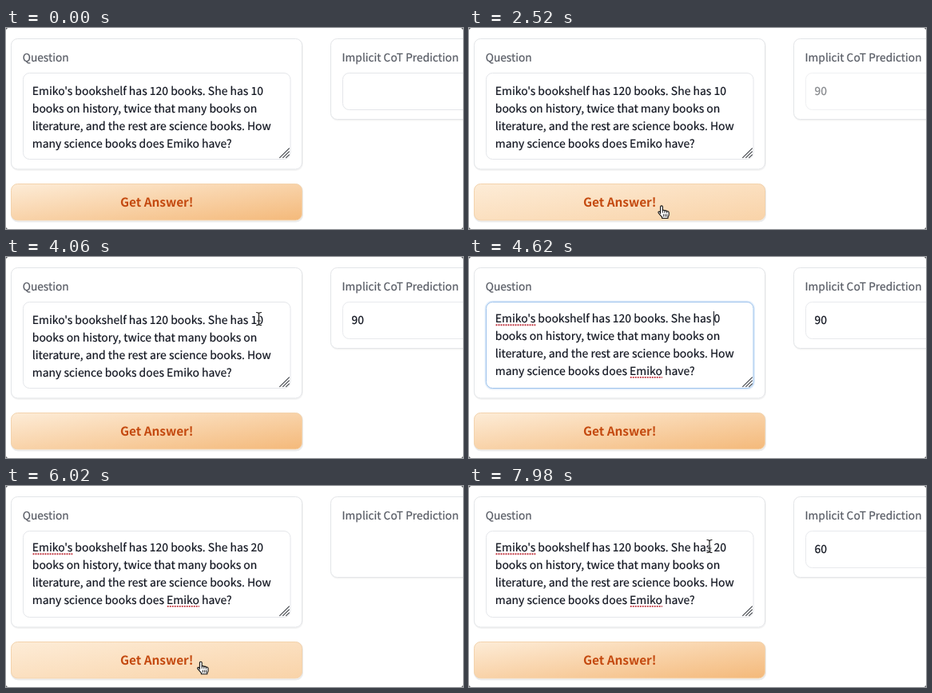
These frames come from a looping animation (572 by 252 pixels, 8 s). An HTML page:

```html
<!DOCTYPE html>
<html lang="en">
<head>
<meta charset="utf-8">
<title>Question form</title>
<style>
  html, body { margin: 0; width: 100%; height: 100%; overflow: hidden; background: #fff; }
  svg { display: block; }
  text {
    font: 13.95px "Noto Sans CJK JP", "Noto Sans CJK SC", "Noto Sans CJK", "Open Sans", sans-serif;
    color: #10141f; fill: currentColor; stroke: currentColor; stroke-width: .2;
    text-rendering: geometricPrecision; white-space: pre;
  }
  .label { font-size: 13.75px; color: #585c65; }
  .action { font-size: 15.4px; font-weight: 700; color: #c44a10; stroke: none; }
  .panel { fill: #fff; stroke: #e3e5e8; }
  .soft { fill: none; stroke: #000; stroke-opacity: .045; stroke-width: 2; }
  .field { fill: #fff; stroke: #e4e6ea; }
  .wavy { stroke: #bf2f3a; stroke-width: 1.9; stroke-dasharray: 1.8 1.2; }
  .grip { stroke: #3f4248; stroke-width: 1.1; }
</style>
</head>
<body>
<svg width="572" height="252" viewBox="0 0 572 252">
  <defs>
    <linearGradient id="fade" x1="0" y1="0" x2="1" y2="1">
      <stop offset="0" stop-color="#fdecd7"/>
      <stop id="fadeEnd" offset="1" stop-color="#f4b97a"/>
    </linearGradient>
  </defs>

  <rect class="soft" x="7" y="14.5" width="364" height="163.5" rx="8"/>
  <rect class="panel" x="6.5" y="13.5" width="364" height="163.5" rx="8"/>
  <text class="label" x="20.7" y="42">Question</text>
  <rect id="ring" x="21.5" y="56.5" width="334.5" height="108" rx="8" fill="none" stroke="#e2eefb" stroke-width="4"/>
  <rect id="box" class="field" x="21.5" y="56.5" width="334.5" height="108" rx="8"/>
  <g id="lines"></g>
  <g id="marks">
    <line class="wavy"/>
    <line class="wavy"/>
  </g>
  <line id="caret" stroke="#10141f" stroke-width="1"/>
  <path class="grip" d="M342.3 162.8L354.7 150.6M346.3 162.8L354.7 154.6M350.3 162.8L354.7 158.6"/>

  <rect class="soft" x="7" y="196.5" width="364" height="46" rx="8" style="stroke-opacity: .08"/>
  <rect x="6.5" y="195.5" width="364" height="45.5" rx="8" fill="url(#fade)" stroke="#f3d3ad"/>
  <text class="action" x="188.7" y="224" text-anchor="middle">Get Answer!</text>

  <rect class="soft" x="407" y="14.5" width="200" height="101" rx="8"/>
  <rect class="panel" x="406.5" y="13.5" width="200" height="101" rx="8"/>
  <text class="label" x="420.6" y="42">Implicit CoT Prediction</text>
  <g id="output">
    <rect id="outBox" class="field" x="421.5" y="56.5" width="180" height="46" rx="8"/>
    <text id="result" x="432.6" y="84.3"></text>
  </g>

  <path d="M0 0H2.5Q.5 .5 0 2.5ZM0 252V249.5Q.5 251.5 2.5 252ZM572 252V249.5Q571.5 251.5 569.5 252ZM572 0H569.5Q571.5 .5 572 2.5Z" fill="#55575a"/>

  <g id="cursor">
    <g id="hand" stroke="#111" stroke-linejoin="round" stroke-linecap="round">
      <path fill="#fff" stroke-width="1.1" d="M-4.4 2.2V-6a1.4 1.4 0 0 1 2.8 0V-1.6Q-.2-2.6 1-1.2Q2.5-2 3.6-.5Q5.8-1 6.2 1V3.8Q6.2 5.4 5 6.6V8.2H-2.4V6.8L-6.9 1.6Q-7.5-.1-6-.2Q-5.2 0-4.4 1.2Z"/>
      <path fill="none" stroke-width=".9" d="M-1.6-1.6V1M1-1.2V1.2M3.6-.5V1.5M-.6 3.4V6M1.6 3.4V6M3.7 3.4V6"/>
    </g>
    <g id="beam" fill="none" stroke-linecap="round">
      <path stroke="#fff" stroke-width="2.6" d="M-3-8Q0-8 0-6V6Q0 8-3 8M3-8Q0-8 0-6M0 6Q0 8 3 8M-2 2.5H2"/>
      <path stroke="#1a1a1a" stroke-width="1.2" d="M-3-8Q0-8 0-6V6Q0 8-3 8M3-8Q0-8 0-6M0 6Q0 8 3 8M-2 2.5H2"/>
    </g>
    <path id="arrow" fill="#111" stroke="#fff" d="M-4-8V6L-1 3.3L1 8L3.2 7L1.2 2.6H5.4Z"/>
  </g>
</svg>

<script>
const LOOP = 8000, TICK = 70;
const NAME = "Emiko";
const $ = id => document.getElementById(id);
const show = (el, on) => el.setAttribute("visibility", on ? "visible" : "hidden");
const put = (el, attrs) => { for (const k in attrs) el.setAttribute(k, attrs[k]); };

const words = [
  `${NAME}'s bookshelf has 120 books. She has `,
  "books on history, twice that many books on",
  "literature, and the rest are science books. How",
  `many science books does ${NAME} have?`
];
const lines = words.map(w => {
  const el = document.createElementNS("http://www.w3.org/2000/svg", "text");
  el.setAttribute("x", 32.8);
  el.textContent = w;
  $("lines").append(el);
  return el;
});

// time, x, y of the cursor's centre
const path = [
  [560, 238, 236], [630, 241, 233], [770, 244, 230.3],
  [2660, 244, 230.3], [2800, 248, 216], [2940, 262, 178], [3150, 287, 120],
  [3360, 299, 88], [3500, 303, 79], [3710, 314, 78.5], [3920, 316.5, 77.5],
  [5110, 316.5, 77.5], [5180, 311, 92], [5250, 296, 132], [5320, 272, 182],
  [5390, 256, 212.5], [5600, 246.8, 227.6],
  [7280, 246.8, 227.6], [7420, 250, 212], [7560, 264, 170], [7770, 287, 108],
  [7910, 298, 80], [7980, 301, 75.5]
];

// time, text, colour, border, visible
const outputs = [
  [0, "", "#10141f", "#e4e6ea", true],
  [1610, "", "#85878b", "#eff0f2", true],
  [2520, "90", "#85878b", "#eff0f2", true],
  [2590, "90", "#10141f", "#e8eaed", true],
  [5740, "90", "#85878b", "#eff0f2", true],
  [5810, "", "#85878b", "#eff0f2", false],
  [6860, "60", "#85878b", "#eff0f2", true],
  [6930, "60", "#10141f", "#e8eaed", true]
];

const within = (t, a, b) => t >= a && t < b;

function cursorAt(t) {
  const i = path.findIndex(p => p[0] > t);
  if (i < 0) return path[path.length - 1].slice(1);
  const [t0, x0, y0] = path[i - 1], [t1, x1, y1] = path[i];
  const k = (t - t0) / (t1 - t0);
  return [x0 + (x1 - x0) * k, y0 + (y1 - y0) * k];
}

function drawCursor(t) {
  const visible = t >= 560 && !within(t, 4480, 5180);
  $("cursor").style.display = visible ? "" : "none";
  if (!visible) return;
  const [x, y] = cursorAt(t);
  $("cursor").setAttribute("transform", `translate(${x} ${y})`);
  const kind = y > 200 ? "hand" : y < 165 ? "beam" : "arrow";
  for (const id of ["hand", "beam", "arrow"]) show($(id), id === kind);
}

function underline(mark, line, length, y) {
  const from = line.textContent.indexOf(NAME);
  put(mark, {
    x1: line.getStartPositionOfChar(from).x + .8,
    x2: line.getEndPositionOfChar(from + length - 1).x,
    y1: y, y2: y
  });
}

function drawQuestion(t) {
  const edited = t >= 4480;
  const focused = within(t, 4130, 5740);
  const top = edited ? 82 : 84.3;
  const first = words[0] + (t < 4480 ? "10" : t < 4760 ? "0" : "20");
  if (lines[0].textContent !== first) lines[0].textContent = first;
  lines.forEach((el, i) => el.setAttribute("y", top + i * 21.9));

  show($("marks"), edited);
  const [a, b] = $("marks").children;
  underline(a, lines[0], NAME.length + 2, top + 3.2);
  underline(b, lines[3], NAME.length, top + 3 * 21.9 + 3.2);

  show($("ring"), focused);
  $("box").style.stroke = focused ? "#9dc2ec" : "#e4e6ea";

  // the caret sits before the last digit and goes out half a second after typing
  show($("caret"), within(t, 4130, 5260));
  const x = lines[0].getStartPositionOfChar(first.length - 1).x;
  put($("caret"), { x1: x, x2: x, y1: top - 14, y2: top + 4 });
}

function drawOutput(t) {
  const [, text, ink, border, on] = outputs.filter(o => o[0] <= t).pop();
  show($("output"), on);
  $("result").textContent = text;
  $("result").style.color = ink;
  $("outBox").style.stroke = border;
}

function draw(now) {
  const t = Math.floor((now % LOOP) / TICK) * TICK;
  const hover = within(t, 630, 2870) || within(t, 5460, 7490);
  $("fadeEnd").setAttribute("stop-color", hover ? "#f9d3a8" : "#f4b97a");
  drawQuestion(t);
  drawOutput(t);
  drawCursor(t);
}

const start = performance.now();
function frame() {
  draw(performance.now() - start);
  requestAnimationFrame(frame);
}
frame();
</script>
</body>
</html>
```
